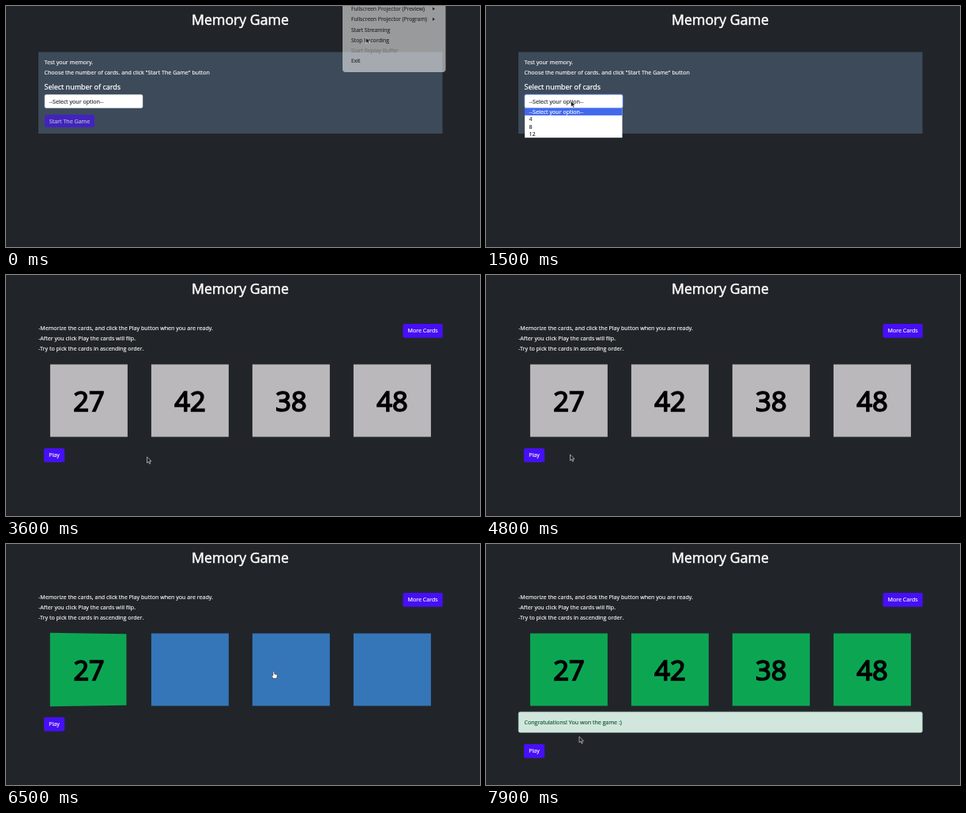
Write an HTML page that moves like this. It is 600 by 306 pixels and loops after 8000 ms.

```html
<!DOCTYPE html>
<html lang="en">
<head>
<meta charset="utf-8">
<title>Memory Game</title>
<style>
html, body { margin: 0; width: 100%; height: 100%; overflow: hidden; background: #212529; }
svg { display: block; width: 100vw; height: 100vh; }
text {
  font: 7.1px "Open Sans", "Noto Sans", sans-serif; white-space: pre;
  fill: var(--ink, #fff); stroke: var(--ink, #fff); stroke-width: .14px;
}
.title { font-size: 17.7px; text-anchor: middle; stroke-width: .5px; }
.head { font-size: 9px; stroke-width: .25px; }
.num { --ink: #000; font-size: 34.5px; text-anchor: middle; stroke-width: 1.7px; }
.dark { --ink: #212529; }
.note { --ink: #0f5132; }
.menu { --ink: #24272a; }
.menu text { font-size: 6.8px; }
.off { --ink: #75777a; }
.mid { text-anchor: middle; }
</style>
</head>
<body>
<svg id="stage" viewBox="0 0 600 306" preserveAspectRatio="none"></svg>
<script>
const LOOP = 8000, STEP = 100;
const OPEN = 1500, HOVER = 1800, PICK = 2000, ENTER = 2200, START = 2700;
const HIDE = 5941, FIRST = 6242, GAP = 303, WON = 7400;
const FLIP = 300, DEPTH = 480;
const INDIGO = '#460ff5', INDIGO_DARK = '#3f10d2';
const BLUE = '#3576b8', GREEN = '#0ca653', GRAY = '#bab8ba';

// Cards are revealed in ascending order, one every GAP ms.
const VALUES = [27, 42, 38, 48];
const SORTED = [...VALUES].sort((a, b) => a - b);
const CARDS = VALUES.map((value, i) =>
  ({ value, x: 104.9 + 128 * i, reveal: FIRST + GAP * SORTED.indexOf(value) }));

// Pointer stops: when the move starts and ends, and where it ends.
const STOPS = [
  { from: 950, to: 1300, x: 107.5, y: 120.5 },
  { from: 1600, to: 1900, x: 62, y: 140 },
  { from: 2100, to: 2400, x: 77, y: 142 },
  { from: 3000, to: 3400, x: 178.5, y: 231 },
  { from: 3600, to: 5600, x: 58.5, y: 226 },
  ...SORTED.map(v => CARDS[VALUES.indexOf(v)])
    .map(c => ({ from: c.reveal - 242, to: c.reveal - 45, x: c.x - 22, y: 161.5 })),
  { from: 7300, to: 7900, x: 118, y: 244.5 }
];

const stage = document.getElementById('stage');
const text = (x, y, s, cls = '') => `<text x="${x}" y="${y}" class="${cls}">${s}</text>`;
const rect = (x, y, w, h, fill, more = '') =>
  `<rect x="${x}" y="${y}" width="${w}" height="${h}" fill="${fill}" ${more}/>`;
const clamp = v => Math.max(0, Math.min(1, v));
const ease = v => v * v * (3 - 2 * v);
const inside = (p, x, y, w, h) => p.x >= x && p.x <= x + w && p.y >= y && p.y <= y + h;

function pointer(t) {
  const p = { x: 455.5, y: 40 };
  for (const s of STOPS) {
    const k = clamp((t - s.from) / (s.to - s.from));
    p.x += (s.x - p.x) * k;
    p.y += (s.y - p.y) * k;
  }
  return p;
}

function button(x, y, w, h, label, hover, more = '') {
  return `<g ${more}>` + rect(x, y, w, h, hover ? INDIGO_DARK : INDIGO, 'rx="2"') +
    text(x + w / 2, y + h / 2 + 2.6, label, 'mid') + '</g>';
}

function options(t) {
  const active = t < HOVER ? 0 : 1;
  return rect(49, 129.5, 123.5, 37.7, '#fff') +
    rect(49, 129.5 + 9.4 * active, 123.5, 9.4, '#4169ee') +
    ['--Select your option--', '4', '8', '12'].map((s, i) =>
      text(54.5, 136.7 + 9.4 * i, s, i === active ? '' : 'dark')).join('');
}

function setup(t, pos) {
  const picked = t >= PICK, focused = t >= OPEN;
  const ring = 'rx="3" stroke="#3d72ee" stroke-opacity=".4" stroke-width="1.5"';
  const hover = t >= ENTER && inside(pos, 49, 138, 63, 16);
  return rect(41, 58.5, 511.5, 103.5, '#3d4a5a') +
    text(48.5, 74.4, 'Test your memory.') +
    text(48.5, 87.3, 'Choose the number of cards. and click "Start The Game" button') +
    text(48.5, 106, 'Select number of cards', 'head') +
    (focused ? rect(48.5, 112, 125, 18, 'none', ring) : '') +
    rect(49, 112.5, 124, 17, '#fff', `rx="2" stroke="${focused ? '#86a9fa' : '#ced4da'}" stroke-width=".5"`) +
    text(54.5, 123.6, picked ? '4' : '--Select your option--', 'dark') +
    button(49, 138, 63, 16, 'Start The Game', hover, picked ? '' : 'opacity=".65"') +
    (focused && !picked ? options(t) : '');
}

function card({ value, reveal, x }, t) {
  const turn = ease(clamp((t - HIDE) / FLIP)) - ease(clamp((t - reveal) / FLIP));
  const cos = Math.cos(turn * Math.PI), sin = Math.sin(turn * Math.PI);
  const corner = (dx, dy) => {
    const k = DEPTH / (DEPTH + dx * sin);
    return `${x + dx * cos * k},${159.5 + dy * k}`;
  };
  const points = [corner(-49, -46), corner(49, -46), corner(49, 46), corner(-49, 46)].join(' ');
  const front = cos > 0;
  const fill = !front ? BLUE : t >= reveal ? GREEN : GRAY;
  return `<polygon points="${points}" fill="${fill}"/>` +
    (front ? `<g transform="translate(${x} 173) scale(${cos} 1)">${text(0, 0, value, 'num')}</g>` : '');
}

function game(t, pos) {
  const won = t >= WON, y = won ? 254 : 220;
  const focused = t >= HIDE && t < FIRST;
  return text(41, 70.4, '-Memorize the cards, and click the Play button when you are ready.') +
    text(41, 83.2, '-After you click Play the cards will flip.') +
    text(41, 96, '-Try to pick the cards in ascending order.') +
    button(502.4, 62, 50.4, 17.7, 'More Cards', false) +
    CARDS.map(c => card(c, t)).join('') +
    (won ? rect(41.2, 213.2, 511.1, 26.1, '#d1e7dd', 'rx="2" stroke="#badbcc" stroke-width=".5"') +
      text(48.5, 228.8, 'Congratulations! You won the game :)', 'note') : '') +
    (focused ? rect(47.5, y - .6, 27.2, 18.8, 'none', 'rx="2.5" stroke="#5a3fd0" stroke-opacity=".6"') : '') +
    button(48, y, 26.2, 17.7, 'Play', inside(pos, 48, y, 26, 17.5));
}

function contextMenu() {
  const rows = ['Fullscreen Projector (Preview)', 'Fullscreen Projector (Program)', 'Start Streaming',
    'Stop Recording', 'Start Replay Buffer', 'Exit'];
  return '<g class="menu">' +
    rect(426, -10, 130.5, 94, '#f0efee', 'rx="4" opacity=".58"') +
    rows.map((s, i) => text(437, 6.2 + 13.25 * i, s, s.includes('Replay') ? 'off' : '')).join('') +
    '<path d="M540 1.5l3 2-3 2zM540 14.8l3 2-3 2z" fill="#24272a"/></g>';
}

function cursor(t, pos) {
  const hand = t < START
    ? t >= ENTER && inside(pos, 49, 138, 63, 16)
    : t < WON && (inside(pos, 48, 220, 26, 17.5) ||
      CARDS.some(c => inside(pos, c.x - 49, 113.5, 98, 92)));
  const shape = hand
    ? '<path d="M-1 .7Q-.1-.5 .9.7V3.5L3.6 4.1Q4.6 4.4 4.4 6L3.8 9.2H-.6L-2.8 6Q-2.4 4.7-1 5.9Z" fill="#fff" stroke="#222" stroke-width=".6"/>'
    : '<path d="M0 0V7.6L1.8 6 3 8.8 4.3 8.2 3.1 5.6 5.5 5.4Z" fill="#222" stroke="#eee" stroke-width=".6"/>';
  return `<g transform="translate(${pos.x} ${pos.y})">${shape}</g>`;
}

function draw(t) {
  const pos = pointer(t);
  stage.innerHTML = rect(0, 0, 600, 306, '#212529') +
    text(296.5, 24, 'Memory Game', 'title') +
    (t < START ? setup(t, pos) : game(t, pos)) +
    (t < STEP ? contextMenu() : '') +
    cursor(t, pos);
}

let last = -1;
function tick() {
  const t = Math.floor((performance.now() + 10) / STEP) * STEP % LOOP;
  if (t !== last) draw(last = t);
  requestAnimationFrame(tick);
}
tick();
</script>
</body>
</html>
```
